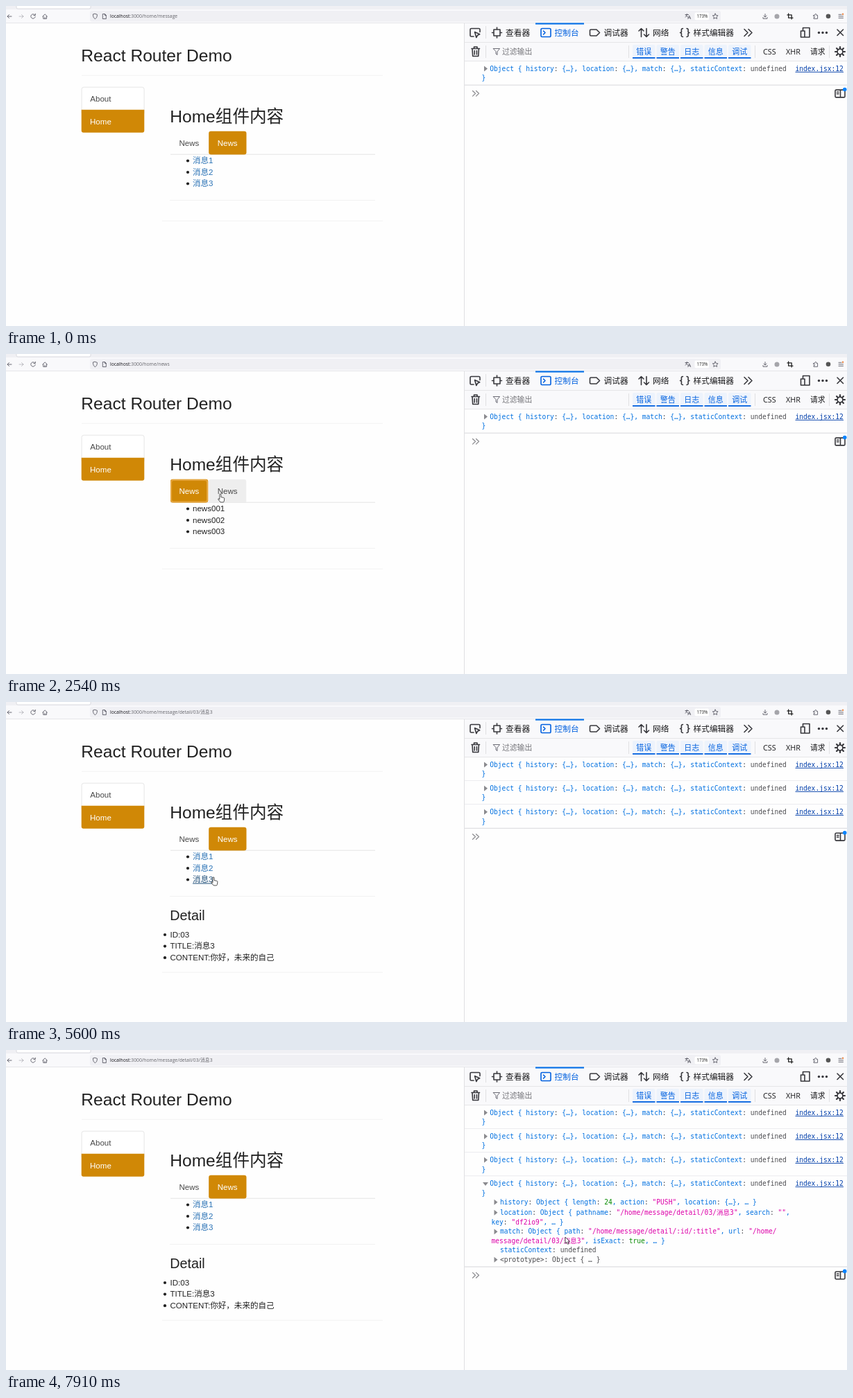
These frames come from a looping animation (1212 by 462 pixels, 7.99 s). An HTML page:

```html
<!DOCTYPE html>
<html lang="zh-CN">
<head>
<meta charset="utf-8">
<title>React Router Demo</title>
<style>
  html, body { margin: 0; width: 100%; height: 100%; overflow: hidden; background: #fefefe; }
  svg { display: block; width: 1212px; height: 462px; }
  text { white-space: pre; }
  .page { font-family: "Liberation Sans", Arial, "Noto Sans CJK SC", sans-serif; font-size: 11.55px; }
  .ui { font-family: "Open Sans", "Noto Sans CJK SC", sans-serif; }
  .mono { font-family: "DejaVu Sans Mono", "Noto Sans CJK SC", monospace; font-size: 9.6px; }
  .icon { fill: none; stroke: #38383d; stroke-width: 1.6; stroke-linecap: round; stroke-linejoin: round; }
  .small { fill: none; stroke: #5b5b66; stroke-width: .9; stroke-linecap: round; stroke-linejoin: round; }
</style>
</head>
<body>
<svg viewBox="0 0 1212 462"><g id="chrome"></g><g id="live"></g></svg>
<script>
const LOOP = 7990;
const INK = '#212121', MUTED = '#484848', ORANGE = '#d08806', LINK = '#2a72b5', LINK_ON = '#23527c';
const BLUE = '#0060df', KEY = '#0070e0', GRAY = '#4c4c50';

const rect = (x, y, w, h, fill, extra = '') =>
  `<rect x="${x}" y="${y}" width="${w}" height="${h}" fill="${fill}" ${extra}/>`;
const text = (x, y, str, cls, fill, size) =>
  `<text x="${x}" y="${y}" class="${cls}" fill="${fill}"${size ? ` style="font-size:${size}px"` : ''}>${str}</text>`;
const path = (d, cls = 'icon', extra = '') => `<path d="${d}" class="${cls}" ${extra}/>`;
const dot = (x, y, r, fill) => `<circle cx="${x}" cy="${y}" r="${r}" fill="${fill}"/>`;
const hLine = (x1, x2, y, color) => rect(x1, y, x2 - x1, 1, color);
const vLine = (x, y1, y2) => rect(x, y1, 1, y2 - y1, '#e0e0e2');
const page = (x, y, str, fill = INK, size) => text(x, y, str, 'page', fill, size);
const bullet = (x, y) => dot(x, y, 2.1, INK);

function browserBar() {
  return rect(0, 0, 1212, 5, '#f0f0f4') + rect(15, -4, 107, 8, '#fff', 'rx="2" stroke="#d4d4da" stroke-width=".8"') +
    rect(0, 5, 1212, 20, '#f9f9fb') + hLine(0, 1212, 24, '#e6e6ea') +
    rect(121, 7, 909, 15.5, '#f0f0f4', 'rx="2.5"') +
    path('M8 15H2m2.5-2.5L2 15l2.5 2.5', 'small') +
    path('M19 15h6m-2.5-2.5L25 15l-2.5 2.5', 'small', 'opacity=".4"') +
    path('M41.6 13a3.2 3.2 0 1 0 .6 2.4M42.3 11.2v2.3H40', 'small') +
    path('M52.8 15l3.3-3.2 3.3 3.2M53.7 14.5v3.8h4.8v-3.8M56.1 18v-2', 'small') +
    path('M128.4 11.3l3 1c0 3.4-.8 5-3 6.3-2.2-1.3-3-2.9-3-6.3z', 'small') +
    path('M139.7 11.5h2.8l1.8 1.8v5.2h-4.6zM142.4 11.5v2h1.9', 'small') +
    path('M979 12.5h4.6M981.3 11.4v1.1c0 1.7-1 2.9-2.3 3.5M980 13.5c.6 1.3 1.5 2 2.6 2.5M982.8 18.5l1.9-4.6 1.9 4.6M983.5 17h2.5', 'small') +
    rect(992.5, 9.5, 20.5, 10.8, '#fff', 'rx="2"') + text(995.5, 17.2, '173%', 'ui', '#222', 6.2) +
    path('M1022.2 11l1.2 2.5 2.7.3-2 1.9.5 2.7-2.4-1.3-2.4 1.3.5-2.7-2-1.9 2.7-.3z', 'small') +
    path('M1094 11.5v4.5m-2-2l2 2 2-2M1091 16.5v1.7h6v-1.7', 'small') +
    dot(1111, 15, 3.5, '#a5a5aa') +
    path('M1127.7 11v6.2h6.3M1126 12.9h6.2v6', 'small', 'style="stroke:#222;stroke-width:1.3"') +
    path('M1164 13.3h1.8c-.5-2.6 2.6-2.6 2.1 0h1.7v5h-5.6v-1.6c2.2.4 2.2-2.3 0-1.9z', 'small') +
    dot(1185, 14.8, 3.3, '#555') +
    path('M1200 12.3h4m-4 2.5h6.5m-6.5 2.5h6.5', 'small') + dot(1206, 11.8, 1.3, '#e8894a');
}

function toolTabs() {
  const label = (x, str, fill = '#18181a') => text(x, 42.6, str, 'ui', fill, 11.7);
  return rect(661, 25, 551, 54, '#f9f9fb') + vLine(660, 25, 462) +
    hLine(661, 1212, 52, '#e6e6e8') + hLine(661, 1212, 79, '#e6e6e8') + rect(763, 24.4, 70, 2.2, '#0a73e8') +
    path('M674 44h-3.5a1.5 1.5 0 0 1-1.5-1.5v-8.5a1.5 1.5 0 0 1 1.5-1.5h11a1.5 1.5 0 0 1 1.5 1.5v3.5M675.5 37.5l2.3 8 1.7-3.2 3.2-1.6z') +
    vLine(691, 29, 47) +
    path('M703 34h9v9h-9zM707.5 31v3m0 9v3M700.5 38.5h2.5m9 0h2.5') + label(720, '查看器') +
    path('M772.5 32.5h11a1.5 1.5 0 0 1 1.5 1.5v9a1.5 1.5 0 0 1-1.5 1.5h-11a1.5 1.5 0 0 1-1.5-1.5v-9a1.5 1.5 0 0 1 1.5-1.5zM774.5 36l2.5 2.5-2.5 2.5', 'icon', `style="stroke:${BLUE}"`) +
    label(790.5, '控制台', BLUE) +
    path('M843 34h8l4.5 4.5-4.5 4.5h-8a1.5 1.5 0 0 1-1.5-1.5v-6a1.5 1.5 0 0 1 1.5-1.5z') + label(861.5, '调试器') +
    path('M915.5 44.5v-12l-3.5 3.5m3.5-3.5l3.5 3.5M923 32.5v12l-3.5-3.5m3.5 3.5l3.5-3.5') + label(932, '网络') +
    path('M975.5 32.5c-3 0-2 2.5-2 4 0 1.3-.8 2-2 2 1.2 0 2 .7 2 2 0 1.5-1 4 2 4M981 32.5c3 0 2 2.5 2 4 0 1.3.8 2 2 2-1.2 0-2 .7-2 2 0 1.5 1 4-2 4') + label(990.5, '样式编辑器') +
    path('M1064 33.5l5 5-5 5m6-10l5 5-5 5') +
    path('M1148.5 35v-3.5h9.5v13.5h-6M1145.5 36h5.5v9h-5.5z') +
    [1171.5, 1177, 1182.5].map(x => dot(x, 38.5, 1.7, '#38383d')).join('') +
    path('M1198 34l8.5 8.5m0-8.5l-8.5 8.5');
}

function filterBar() {
  const on = ['错误', '警告', '日志', '信息', '调试'].map((name, i) => {
    const x = 903 + i * 34.5;
    return rect(x, 56, 32.5, 19.5, '#edf3fc', 'rx="2"') + rect(x, 74, 32.5, 1.8, BLUE) +
      text(x + 5.3, 69.9, name, 'ui', BLUE, 11);
  }).join('');
  const off = [[1091, 'CSS'], [1124, 'XHR'], [1159, '请求']]
    .map(([x, name]) => text(x, 69.8, name, 'ui', '#18181a', 10.8)).join('');
  const teeth = Array.from({ length: 8 }, (_, i) =>
    `<path d="M1202 59v3" class="icon" style="stroke-width:2.2" transform="rotate(${i * 45} 1202 66)"/>`).join('');
  return path('M671 61.5h11.5M674.5 61v-2h4.5v2M672 62l.7 10.5h8l.7-10.5M675.2 64.5v5.5m3.2-5.5v5.5') +
    vLine(691, 57, 75) + path('M702.5 61.5h9l-3.5 4.5v4.5l-2-1.5v-3z', 'small') +
    text(715, 69.7, '过滤输出', 'ui', '#75757a', 10.8) + vLine(897, 57, 75) + on +
    vLine(1079, 57, 75) + off + vLine(1186, 57, 75) + teeth +
    '<circle cx="1202" cy="66" r="4" class="icon"/>';
}

function pageFrame() {
  return page(108.3, 79.5, 'React Router Demo', INK, 24.6) + hLine(109, 543, 99.7, '#f2f2f2') +
    rect(109.1, 117.2, 90, 40, '#fff', 'rx="3" stroke="#e4e4e4" stroke-width=".9"') + page(121.3, 137.7, 'About', MUTED) +
    `<path d="M108.7 149.8h90.6v30q0 3-3 3h-84.6q-3 0-3-3z" fill="${ORANGE}"/>` + page(121, 170.7, 'Home', '#fff') +
    page(236.2, 168.3, 'Home组件内容', INK, 24.6) +
    hLine(237, 532, 213.7, '#e4e4e4') + hLine(236, 532, 280, '#f2f2f2');
}

// time, x, y of the pointer tip
const POINTER = [
  [80, 1160, 452], [300, 760, 250], [480, 420, 110], [620, 165, 95], [870, 288, 222], [970, 287, 219],
  [1380, 285, 207], [1870, 285, 207], [2040, 284, 205.5], [2300, 284, 205.5], [2620, 317, 201],
  [2750, 317, 201], [2940, 312, 207], [3050, 312, 207], [3120, 300, 219], [3300, 294, 222], [3500, 294, 222],
  [3790, 288, 239], [4370, 287, 239], [4950, 287, 239], [5400, 299, 253], [5780, 299, 253],
  [6510, 692, 199], [6610, 696, 193], [6680, 696.5, 192.5], [6800, 696.5, 192.5], [7320, 835, 264],
  [7660, 835, 264], [7910, 806, 270]
];
const CLICK = { news: 2120, messages: 2700, first: 3470, second: 4950, third: 5520, expand: 6610 };
const LOGS_AT = [0, 3550, 5030, 5680];
const CONTENTS = ['中国', '小伙伴', '未来的自己'];

function pointerAt(t) {
  if (t < POINTER[0][0]) return null;
  const i = POINTER.findIndex(k => k[0] > t);
  if (i < 0) return POINTER[POINTER.length - 1].slice(1);
  const [t0, x0, y0] = POINTER[i - 1], [t1, x1, y1] = POINTER[i];
  const f = (t - t0) / (t1 - t0);
  return [x0 + (x1 - x0) * f, y0 + (y1 - y0) * f];
}

const inside = (p, x1, y1, x2, y2) => !!p && p[0] >= x1 && p[0] <= x2 && p[1] >= y1 && p[1] <= y2;

function tab(x, active, hover, focus) {
  const back = active ? rect(x, 180.8, 54.3, 33.7, ORANGE, 'rx="3.3"')
    : hover ? `<path d="M${x} 214v-30q0-3 3-3h48q3 0 3 3v30z" fill="#eee"/>` : '';
  const ring = focus ? rect(x + 1, 182, 52, 31.5, 'none', 'rx="3" stroke="#e5a53e" stroke-width="2"') : '';
  return back + ring + page(x + 12.5, 201.8, 'News', active ? '#fff' : MUTED);
}

function link(i, on) {
  const y = 227.2 + i * 16.5;
  return page(269, y, `消息${i + 1}`, on ? LINK_ON : LINK) + (on ? rect(269, y + 1.3, 29.5, 1, LINK_ON) : '');
}

function detail(id) {
  const rows = [`ID:0${id}`, `TITLE:消息${id}`, `CONTENT:你好，${CONTENTS[id - 1]}`];
  return page(236.2, 315.2, 'Detail', INK, 19.8) +
    rows.map((row, i) => bullet(229, 336 + i * 16.6) + page(236.5, 339.7 + i * 16.6, row)).join('');
}

const escapeTags = s => s.replace(/</g, '&lt;').replace(/>/g, '&gt;');
function code(x, y, line, base = KEY) {
  const rule = /("[^"]*"?|^message[^"]*")|\b(24|true)\b|(undefined)|(:)/g;
  const marked = escapeTags(line).replace(rule, (m, str, num) =>
    `<tspan fill="${str ? '#dd00a9' : num ? '#058b00' : GRAY}">${m}</tspan>`);
  return text(x, y, marked, 'mono', base);
}

const arrow = (x, y, open) => `<path d="${open
  ? `M${x - 4} ${y - 2}h8l-4 5z` : `M${x - 2} ${y - 4}l5 4-5 4z`}" fill="#8a8a8e"/>`;

function logRow(i, open) {
  const y = 90.3 + i * 34.1;
  return arrow(691, y + .3, open) +
    code(697.3, y + 3.2, 'Object { history: {…}, location: {…}, match: {…}, staticContext: undefined') +
    code(685.5, y + 17, '}') + text(1137.5, y + 3.2, 'index.jsx:12', 'mono', '#003eaa') +
    rect(1137.5, y + 4.6, 69.5, .9, '#003eaa');
}

function expanded() {
  const rows = [
    [219, 1, 'history: Object { length: 24, action: "PUSH", location: {…}, … }'],
    [234, 1, 'location: Object { pathname: "/home/message/detail/03/消息3", search: "",'],
    [248, 0, 'key: "df2io9", … }'],
    [261.5, 1, 'match: Object { path: "/home/message/detail/:id/:title", url: "/home/'],
    [275, 0, 'message/detail/03/消息3", isExact: true, … }'],
    [288.5, 2, 'staticContext: undefined'],
    [302, 1, '<prototype>: Object { … }']
  ];
  return rows.map(([y, kind, line]) => (kind === 1 ? arrow(705.5, y + .7) : '') +
    code(kind ? 712 : 699.5, y + 3.9, line, line[0] === '<' ? GRAY : KEY)).join('');
}

function consoleView(t) {
  const count = LOGS_AT.filter(at => t >= at).length, open = t >= CLICK.expand;
  const end = open ? 312.5 : 79.5 + count * 34.1;
  let out = '';
  for (let i = 0; i < count; i++) {
    out += logRow(i, open && i === 3);
    if (i < count - 1) out += hLine(661, 1212, 113 + i * 34.1, '#ececef');
  }
  const y = end + 12.7;
  return out + (open ? expanded() : '') + hLine(661, 1212, end, '#d7d7db') +
    path(`M672.5 ${y - 3.8}l4 3.8-4 3.8m5-7.6l4 3.8-4 3.8`, 'icon', 'style="stroke:#8a8a8e;stroke-width:1.2"') +
    path(`M1196.5 ${y - 5.2}h11a1.5 1.5 0 0 1 1.5 1.5v7.8a1.5 1.5 0 0 1-1.5 1.5h-11a1.5 1.5 0 0 1-1.5-1.5v-7.8a1.5 1.5 0 0 1 1.5-1.5zM1202.5 ${y - 5}v10.5M1197.5 ${y - 2}h2.5m-2.5 2.5h2.5`) +
    dot(1208.7, y - 5.8, 2.8, '#0a84ff');
}

function pointer([x, y], hand) {
  const d = hand
    ? 'M-1 1q0-1.2 1-1.2t1 1.2v3.5l3.8.8q1.2.3 1.1 1.5l-.5 3.7-.8 1.4h-4.4l-3.2-4q-.4-1.3.8-1.1l1.2 1z'
    : 'M0 0v9.3l2.2-1.9 1.4 3 1.5-.7-1.3-2.9h2.7z';
  return `<path d="${d}" fill="#fff" stroke="#333" stroke-width=".85" stroke-linejoin="round" transform="translate(${x} ${y})"/>`;
}

function render(t) {
  const p = pointerAt(t);
  const onNews = t >= CLICK.news && t < CLICK.messages;
  const id = [CLICK.first, CLICK.second, CLICK.third].filter(at => t >= at).length;
  const overTab = [237, 292].map(x => inside(p, x, 181, x + 54, 214));
  const overLink = [0, 1, 2].map(i => !onNews && inside(p, 269, 215 + i * 16.5, 299.5, 231 + i * 16.5));
  const overArrow = t > 6000 && inside(p, 686, 186, 699, 200);
  // the link takes focus on mouse down, just before its click lands
  const focusLink = t >= CLICK.expand ? -1 : t >= 5450 ? 2 : t >= 4900 ? 1 : t >= 3380 ? 0 : -1;
  const url = onNews ? '/home/news' : '/home/message' + (id ? `/detail/0${id}/消息${id}` : '');

  let out = text(150, 17.3, `<tspan fill="#15141a">localhost</tspan>:3000${url}`, 'ui', '#66666c', 6.8);
  out += tab(237, onNews, overTab[0], onNews);
  out += tab(292.2, !onNews, overTab[1], t >= CLICK.messages && t < 3300);
  for (let i = 0; i < 3; i++) {
    out += bullet(262, 223.5 + i * 16.5);
    out += onNews ? page(269, 227.2 + i * 16.5, `news00${i + 1}`) : link(i, overLink[i] || focusLink === i);
  }
  out += hLine(225, 543, id ? 389.7 : 309.7, '#f2f2f2') + (id ? detail(id) : '') + consoleView(t);
  if (p) out += pointer(p, overTab.includes(true) || overLink.includes(true) || overArrow);
  document.getElementById('live').innerHTML = out;
}

document.getElementById('chrome').innerHTML = browserBar() + toolTabs() + filterBar() + pageFrame();
const start = performance.now();
function tick() {
  render((performance.now() - start) % LOOP);
  requestAnimationFrame(tick);
}
tick();
</script>
</body>
</html>
```
